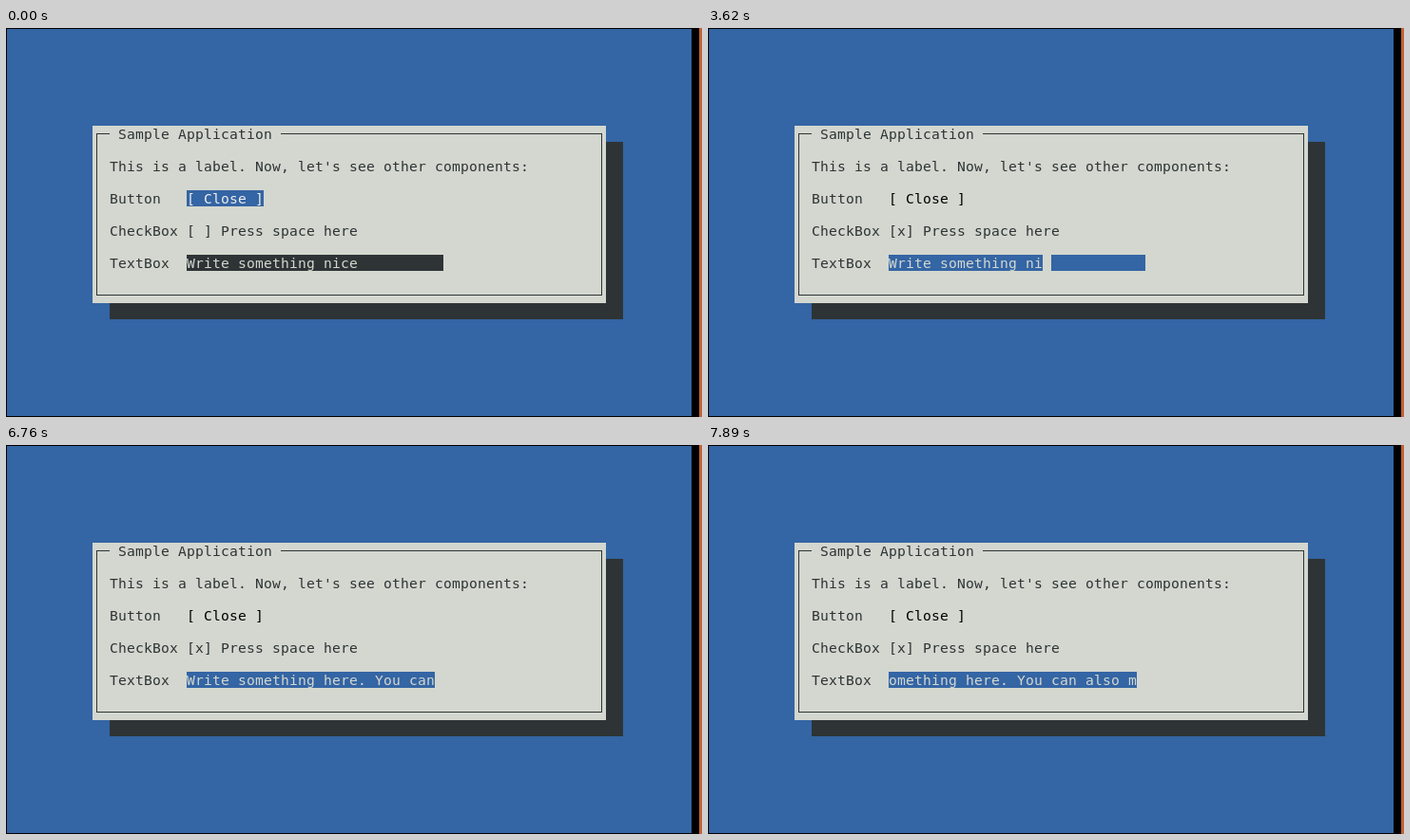
Animation of 732 by 410 pixels, one loop 7990 ms. Source, as an HTML page:

```html
<!DOCTYPE html>
<html lang="en">
<head>
<meta charset="utf-8">
<title>Sample Application</title>
<style>
  :root { --blue: #3465a4; --light: #d3d7cf; --dark: #2e3436; }
  html, body { margin: 0; width: 100%; height: 100%; overflow: hidden; background: #000; }
  #stage { position: relative; width: 732px; height: 410px; overflow: hidden; background: #000; }
  #stage * { position: absolute; box-sizing: border-box; }
  #edge { left: 729px; top: 0; width: 3px; height: 410px; background: #c0603a; }
  #term {
    left: 1px; top: 1px; width: 720px; height: 408px; background: var(--blue);
    font: 14.667px/17px "DejaVu Sans Mono", monospace; color: var(--dark); white-space: pre;
  }
  /* 80 x 24 character grid, 9 x 17 px per cell */
  #term > * { left: calc(var(--c) * 9px); top: calc(var(--r) * 17px); height: 17px; }
  #term > .block { width: 540px; height: 187px; }
  .shadow { background: var(--dark); }
  .panel { background: var(--light); }
  .frame { left: 4px; top: 8px; width: 532px; height: 171px; border: 1px solid var(--dark); }
  .title { background: var(--light); }
  #button { width: 81px; color: #000; }
  #check { width: 180px; }
  #box { width: 270px; background: var(--dark); color: var(--light); }
  #term > .focus { background: var(--blue); color: var(--light); }
  #term > #button.focus { color: #eeeeec; }
  #cursor { width: 9px; background: var(--light); }
</style>
</head>
<body>
<div id="stage">
  <div id="term">
    <div class="block shadow" style="--c:12;--r:7"></div>
    <div class="block panel" style="--c:10;--r:6"><div class="frame"></div></div>
    <div class="title" style="--c:12;--r:6"> Sample Application </div>
    <div id="label" style="--c:12;--r:8">This is a label. Now, let's see other components:</div>
    <div style="--c:12;--r:10">Button</div>
    <div id="button" style="--c:21;--r:10">[ Close ]</div>
    <div style="--c:12;--r:12">CheckBox</div>
    <div id="check" style="--c:21;--r:12">[ ] Press space here</div>
    <div style="--c:12;--r:14">TextBox</div>
    <div id="box" style="--c:21;--r:14">Write something nice</div>
    <div id="cursor" style="--c:41;--r:14" hidden></div>
  </div>
  <div id="edge"></div>
</div>
<script>
  const LOOP = 7990, CELL = 9, COLUMNS = 30, BOX_COLUMN = 21;
  const FOCUS_CHECK = 1080, TICK = 1670, FOCUS_BOX = 2280;
  const CURSOR_OFF = 4750, CURSOR_ON = 6680;
  const initial = "Write something nice";
  const typed = "here. You can also m";
  const eraseTimes = [3480, 3620, 3780, 4010];
  const typeTimes = [4380, 4520, 4650, 4750, 5280, 5620, 5970, 6160, 6260, 6380,
                     6490, 6590, 6680, 6780, 6870, 7010, 7150, 7280, 7680, 7890];

  const [term, label, button, check, box, cursor] =
    ["term", "label", "button", "check", "box", "cursor"].map(id => document.getElementById(id));

  // Keep the font's advance on the terminal grid.
  const advance = label.getBoundingClientRect().width / label.textContent.length;
  term.style.letterSpacing = (CELL - advance) + "px";

  const countUntil = (times, t) => times.filter(time => time <= t).length;
  const setText = (el, text) => { if (el.textContent !== text) el.textContent = text; };

  function render(t) {
    const inBox = t >= FOCUS_BOX;
    button.classList.toggle("focus", t < FOCUS_CHECK);
    check.classList.toggle("focus", t >= FOCUS_CHECK && !inBox);
    box.classList.toggle("focus", inBox);
    setText(check, `[${t >= TICK ? "x" : " "}] Press space here`);

    const text = initial.slice(0, initial.length - countUntil(eraseTimes, t))
      + typed.slice(0, countUntil(typeTimes, t));
    const last = COLUMNS - 1;
    setText(box, text.slice(Math.max(0, text.length - last)));

    cursor.hidden = !inBox || (t >= CURSOR_OFF && t < CURSOR_ON);
    cursor.style.setProperty("--c", BOX_COLUMN + Math.min(text.length, last));
  }

  const start = performance.now();
  function tick() {
    render((performance.now() - start) % LOOP);
    requestAnimationFrame(tick);
  }
  render(0);
  requestAnimationFrame(tick);
</script>
</body>
</html>
```
